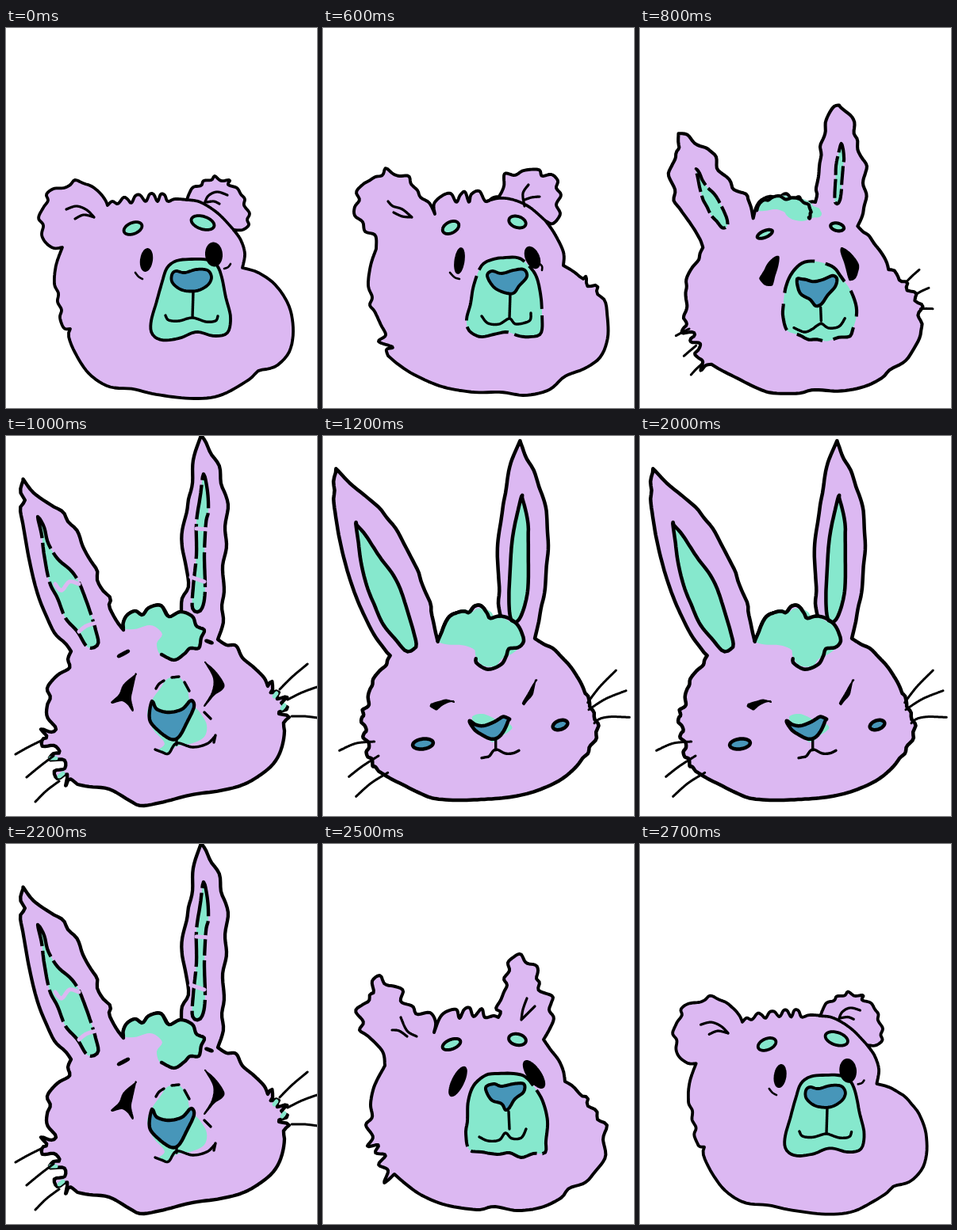
Recreate the animation shown at these times as an HTML page. Size 392 px wide and 480 px high, loop 2.8 s.

```html
<!DOCTYPE html>
<html lang="en">
<head>
<meta charset="utf-8">
<title>Bear to rabbit</title>
<style>
html, body { margin: 0; width: 100%; height: 100%; overflow: hidden; background: #fff; }
svg { display: block; width: 100%; height: 100%; }
</style>
</head>
<body>
<svg id="stage" viewBox="0 0 392 480" stroke-linecap="round" stroke-linejoin="round"></svg>
<script>
const INK = '#000', LILAC = '#dcb8f2', MINT = '#86e8cd', BLUE = '#4796b9';
const LOOP = 2800, STEP = 100, SAMPLES = 90;

// Pose per 100 ms: 0 is the bear, 8 the rabbit, the rest are in-betweens.
const poses = [0, 0, 0, 0, 0, 0, 1, 2, 3, 4, 5, 6, 7, 7.92,
               8, 8, 8, 8, 8, 8, 7, 6, 5, 4, 3, 2, 1, 0.08];

function oval(cx, cy, rx, ry, deg) {
  const a = deg * Math.PI / 180, pts = [];
  for (let i = 0; i < 12; i++) {
    const t = i * Math.PI / 6, x = rx * Math.sin(t), y = -ry * Math.cos(t);
    pts.push((cx + x * Math.cos(a) - y * Math.sin(a)) + ',' + (cy + x * Math.sin(a) + y * Math.cos(a)));
  }
  return pts.join(' ');
}

// In a key, "|" joins segments of one contour and "/" starts a new contour.
const parts = [
  { fill: LILAC, stroke: INK, closed: true, keys: {
    0: '71,277 60,278 50,271 45,261 47,249 41,240 47,227 53,218 51,210 60,203 73,202 81,198 87,192 97,196 108,200 118,208 125,217 128,224' +
      '|128,224 134,219 141,222 148,214 153,216 158,221 163,212 169,211 176,219 181,210 186,210 191,219 195,210 200,211 204,219 213,216 228,217' +
      '|228,217 231,209 236,201 246,199 249,193 259,192 263,187 271,193 282,192 280,198 291,202 296,210 301,216 300,224 307,234 304,242 306,249 298,255 287,255' +
      '|287,255 296,268 301,285 298,303' +
      '|298,303 318,309 340,325 357,352 362,383 357,409 342,426 328,431 318,433 305,445 270,464 235,468 190,463 160,456 130,453 105,437 88,412 79,390 81,380' +
      '|81,380 73,379 68,366 70,356 65,346 66,335 61,323 63,300 71,277',
    1: '67,279 66,262 53,257 50,245 40,237 40,226 46,217 42,207 51,197 58,193 66,188 75,186 79,177 88,184 96,187 108,187 111,197 119,205 123,214 134,221 141,235' +
      '|141,235 140,222 150,212 161,209 168,220 173,211 179,207 184,220 187,210 197,206 205,219 215,214 222,213' +
      '|222,213 228,200 229,184 242,186 253,180 272,179 276,187 288,185 296,193 294,202 300,211 294,223 299,235 290,247 281,244' +
      '|281,244 292,260 303,283 303,300' +
      '|303,300 315,307 328,317 332,313 333,326 346,325 345,335 355,344 358,360 359,390 350,415 330,430 305,440 285,457 255,464 225,460 190,460 150,453 115,438 95,425 82,414' +
      '|82,414 80,406 88,403 70,396 79,388 73,375 65,358 59,350 62,340 57,325 60,300 67,279',
    2: '78,280 75,262 57,243 46,235 51,225 41,211 50,203 58,198 59,190 64,187 62,173 72,166 78,177 91,180 101,185 98,199 113,205 118,215 135,213 142,225 140,238' +
      '|140,238 147,220 155,212 168,209 172,220 178,209 185,207 190,218 200,208 204,219 215,217 221,219' +
      '|221,219 224,212 218,208 224,197 228,187 232,178 228,170 235,160 233,150 240,143 249,139 256,150 268,153 271,160 269,170 273,175 272,185 289,192 288,200 285,210 291,220 285,235 278,247' +
      '|278,247 287,260 297,273 303,287 305,300' +
      '|305,300 315,306 326,318 334,320 333,330 345,337 346,348 358,355 353,372 356,395 342,415 330,428 310,435 300,447 275,459 245,463 215,458 195,462 155,456 125,444 105,430 90,417' +
      '|90,417 77,428 82,412 70,405 79,393 66,390 70,380 56,382 63,370 54,355 62,345 60,328 65,305 78,280',
    5: '82,272 75,262 62,250 52,230 40,200 30,160 22,115 18,91 24,82 18,70 22,55 22,55 35,72 58,88 72,96 78,108 90,120 97,140 107,158 115,170 115,182 122,195 132,205 130,215 139,233 148,245' +
      '|148,245 148,235 153,226 163,221 172,226 180,217 195,214 205,228 212,227 221,222' +
      '|221,222 222,205 230,190 227,165 222,140 222,120 228,95 230,80 235,60 236,30 246,-1 246,-1 252,8 258,22 269,38 271,60 277,75 280,90 276,115 278,140 273,165 275,195 272,215 274,235 267,257' +
      '|267,257 278,264 290,265 298,280 312,292 325,305 330,316' +
      '|330,316 335,309 336,321 333,325 344,322 341,332 355,329 347,338 356,344 342,350 357,354 350,362 351,374 348,392 340,410 325,425 300,440 270,448 235,453 195,463 170,467 155,460 130,446 105,443 90,440' +
      '|90,440 80,433 75,443 77,427 65,433 61,423 74,420 73,409 55,409 60,401 68,400 61,391 46,392 46,383 52,380 44,370 57,374 63,369 52,355 52,340 56,330 52,318 65,302 80,293 78,282 82,272',
    8: '86,280 78,272 62,245 45,210 30,170 18,125 12,85 10,55 15,36 15,36 35,55 60,77 85,105 105,135 122,170 135,205 141,235 143,267' +
      '|143,267 150,255 157,233 167,222 178,222 185,227 190,216 200,213 209,223 211,232 225,230' +
      '|225,230 219,205 218,160 222,120 228,75 236,40 249,11 249,11 255,30 266,50 278,80 285,110 287,140 285,175 280,205 272,230 267,255' +
      '|267,255 290,270 310,287 322,308 331,330' +
      '|331,330 340,360 344,385 335,410 315,430 285,445 240,457 200,462 160,461 120,452 85,437 60,415' +
      '|60,415 52,390 48,360 55,325 70,300 86,280' } },
  { stroke: INK, width: 3.6, keys: {
    0: '228,217 245,220 267,234 287,255', 1: '205,219 222,215 240,217 260,226 281,244' }, to: 1 },
  { stroke: INK, width: 3.2, keys: {
    0: '76,229 89,225 102,230 111,239/87,241 98,236 111,239/250,222 255,212 266,207 279,211/253,220 262,219 269,222',
    1: '82,219 88,225 100,229 112,239/89,233 100,238 112,239/254,225 252,209 259,198/254,217 263,214 273,213',
    2: '87,235 96,236 106,243/98,219 106,236 118,243/257,195 252,209 250,222/250,222 258,214 267,205' }, to: 2 },
  { fill: MINT, stroke: INK, closed: true, from: 3, dash: { 3: '24 5', 4: '32 6', 5: '44 6', 6: '90 4' }, keys: {
    2: '86,216 99,229 108,240 103,245 92,233/256,195 258,207 252,222 250,207',
    5: '40,102 48,115 53,135 65,155 82,170 92,185 100,205 107,225 113,245 116,263 103,267 90,247 75,230 65,205 55,185 48,150 45,125' +
      '/249,48 254,70 255,95 252,110 250,150 251,190 249,212 243,222 235,217 236,190 240,150 240,110 245,75',
    8: '42,115 42,115 60,130 80,160 97,190 108,225 118,262 116,270 107,275 95,265 75,240 60,205 48,165' +
      '/251,90 251,90 260,120 263,160 262,200 252,230 243,243 236,235 233,205 235,165 241,125' } },
  { stroke: LILAC, width: 5, from: 4, to: 6, keys: {
    4: '66,196 73,200 81,190 86,191/94,243 112,237/241,122 253,123/236,181 250,184',
    5: '62,187 70,195 80,184 92,187/92,247 101,240 113,236/240,117 255,118/233,178 250,184',
    6: '60,184 66,189 72,182/97,255 110,250/246,118 255,119/238,190 244,192' } },
  { fill: MINT, closed: true, from: 3, keys: {
    2: '147,224 155,214 170,211 190,211 210,218 221,221 215,225 190,224 165,224',
    5: '148,243 148,235 153,226 163,221 172,226 180,217 195,214 205,228 220,222 235,228 240,240 250,245 246,255 243,268 232,268 225,275 212,283 195,277 190,262 197,250 183,239 162,244',
    8: '143,267 150,255 157,233 167,222 178,222 185,227 190,216 200,213 209,223 211,232 225,230 240,235 254,248 255,265 246,275 230,281 226,295 206,301 190,291 190,283 172,276 155,273' } },
  { stroke: INK, from: 3, keys: {
    2: '147,224 155,214 170,211 190,211 210,218 221,221',
    5: '148,243 148,235 153,226 163,221 172,226 180,217 195,214 205,228 220,222 235,228 240,240 250,245 246,255 243,268 232,268 225,275 212,283 196,276',
    8: '143,267 150,255 157,233 167,222 178,222 185,227 190,216 200,213 209,223 211,232 225,230 240,235 254,248 255,265 246,274 229,270 229,283 225,295 206,301 190,291 191,284' } },
  { fill: MINT, stroke: INK, closed: true, to: 5, keys: {
    0: oval(160, 253, 12, 7, -22) + '/' + oval(248, 246, 15, 8, 18),
    1: oval(161, 252, 11, 7, -28) + '/' + oval(245, 245, 11, 7, 18),
    2: oval(162, 253, 12, 6, -22) + '/' + oval(245, 247, 11, 7, 12),
    5: oval(148, 275, 7, 0.4, -28) + '/' + oval(256, 260, 4, 0.4, 20) } },
  { stroke: INK, width: 2.6, to: 1, keys: {
    0: '163,309 167,314 172,317/275,304 280,302 283,298', 1: '160,309 166,315 172,317/272,297 276,301 276,306' } },
  { fill: MINT, stroke: INK, closed: true, to: 7,
    dash: { 1: '58 8', 2: '86 7', 3: '34 14', 4: '16 22', 5: '0 999', 6: '0 999', 7: '0 999' }, keys: {
    0: '203,303 215,294 235,292 255,293 266,300 272,315 277,340 283,365 279,385 262,389 240,384 218,392 196,394 184,386 183,370 190,345 197,320',
    1: '200,300 215,292 230,290 245,290 255,296 268,312 274,335 276,360 275,385 262,390 247,389 232,384 215,387 198,390 184,382 181,368 186,348 190,325',
    2: '190,305 205,292 220,290 240,290 255,294 267,308 277,325 283,350 281,375 280,390 265,391 250,396 235,390 220,392 200,389 184,386 180,365 182,350 183,325',
    5: '195,318 203,307 217,304 228,318 232,335 245,350 253,365 250,380 235,388 215,392 205,400 192,397 200,388 185,370 178,350 185,332',
    8: '185,372 200,375 215,368 235,361 230,373 218,384 204,381 192,377' } },
  { stroke: INK, width: 3.4, from: 4.5, to: 6, keys: {
    5: '189,319 193,313 199,309/209,305 218,304/225,311 231,322/250,349 258,357/264,378 262,387',
    6: '193,331 199,327/212,323 218,322/225,328 230,336/247,355 251,361/254,382 252,388' } },
  { fill: INK, stroke: INK, width: 2, closed: true, keys: {
    0: oval(177, 293, 7, 14, 8) + '/' + oval(262, 286, 10, 14.5, -4),
    1: oval(172, 294, 5.5, 16, 8) + '/' + oval(264, 290, 8, 14, -24),
    2: oval(170, 300, 7, 20, 26) + '/' + oval(266, 291, 8, 20, -35),
    5: '163,302 163,302 159,320 157,332 160,347 154,339 146,334 133,337 143,327 149,314/252,287 252,287 264,298 274,313 272,320 262,327 250,341 260,324 262,306',
    8: '166,353 157,347 146,345 135,345 127,343 137,340 147,339 158,343/278,319 269,323 258,332 251,343 255,331 265,320' } },
  { fill: BLUE, stroke: INK, closed: true, keys: {
    0: '209,312 214,307 225,309 240,305 254,306 259,315 254,325 240,332 222,331 210,322',
    1: '207,313 213,307 225,310 240,306 253,305 257,314 247,326 240,335 228,334 215,327',
    2: '205,308 215,303 225,306 240,303 253,303 253,313 242,322 235,333 230,336 225,328 212,323',
    5: '184,335 190,345 205,349 222,345 233,334 237,342 228,362 218,380 208,383 193,373 181,358',
    8: '185,372 200,375 215,368 235,361 235,361 230,373 218,384 204,381 192,377' } },
  { stroke: INK, width: 3.4, keys: {
    0: '236,333 235,366/201,363 205,369 218,370 235,366 252,371 264,370 267,364',
    1: '236,336 235,367/200,364 208,373 222,374 235,367 243,374 260,370 262,360',
    2: '234,338 235,360/197,370 208,375 222,374 230,365 238,372 250,371 256,360',
    5: '215,383 215,390/188,396 196,399 205,401 215,388 235,393 253,389 263,380',
    8: '219,384 219,400/206,412 212,406 219,400 228,406 239,406' } },
  { fill: BLUE, stroke: INK, closed: true, from: 6, keys: {
    5: oval(126, 389, 1, 1, 0) + '/' + oval(299, 365, 1, 1, 0),
    8: oval(126, 389, 19, 9, -8) + '/' + oval(299, 365, 14, 8, -20) } },
  { stroke: MINT, width: 5, from: 5, to: 6, keys: {
    5: '56,407 63,407/67,430 72,426/341,325 338,329/351,340 348,344',
    6: '60,408 63,408/71,429 73,427/340,328 339,330/348,342 347,344' } },
  { stroke: INK, width: 3, from: 3, keys: {
    2: '62,382 70,378/70,406 76,400/78,426 84,418/332,320 338,314/344,338 350,334/350,355 357,354',
    5: '12,402 28,393 46,384/26,431 43,417 60,404/37,462 51,448 67,436/345,320 361,304 380,288/355,333 373,324 392,317/360,354 376,354 393,356',
    8: '25,395 48,386 74,387/36,430 53,417 75,404/44,452 65,434 89,420/328,345 343,323 364,300/325,352 348,336 377,324/333,367 340,359 355,355 383,355' } }
];

const lerp = (a, b, t) => a + (b - a) * t;

// Smooth curve through the points, resampled at even distances.
function sample(text, closed) {
  const p = text.trim().split(' ').map(s => s.split(',').map(Number)), n = p.length;
  const at = i => closed ? p[(i + n) % n] : p[Math.max(0, Math.min(n - 1, i))];
  const fine = [], dist = [0];
  for (let i = 0; i < (closed ? n : n - 1); i++) {
    const [a, b, c, d] = [at(i - 1), at(i), at(i + 1), at(i + 2)];
    for (let k = 0; k < 10; k++) {
      const t = k / 10;
      fine.push([0, 1].map(j => b[j] + t / 2 * (c[j] - a[j] +
        t * (2 * a[j] - 5 * b[j] + 4 * c[j] - d[j] + t * (3 * (b[j] - c[j]) + d[j] - a[j])))));
    }
  }
  fine.push(closed ? p[0] : p[n - 1]);
  for (let i = 1; i < fine.length; i++)
    dist.push(dist[i - 1] + Math.hypot(fine[i][0] - fine[i - 1][0], fine[i][1] - fine[i - 1][1]));
  const out = [], total = dist[dist.length - 1];
  for (let k = 0, i = 1; k <= SAMPLES; k++) {
    const want = total * k / SAMPLES;
    while (i < fine.length - 1 && dist[i] < want) i++;
    const t = (want - dist[i - 1]) / (dist[i] - dist[i - 1] || 1);
    out.push([lerp(fine[i - 1][0], fine[i][0], t), lerp(fine[i - 1][1], fine[i][1], t)]);
  }
  return out;
}

function contours(key, closed) {
  return key.split('/').map(c => {
    const segs = c.split('|');
    return segs.flatMap(s => sample(s, closed && segs.length === 1));
  });
}

const stage = document.getElementById('stage');
for (const part of parts) {
  part.times = Object.keys(part.keys).map(Number);
  part.shapes = part.times.map(k => contours(part.keys[k], part.closed));
  part.el = document.createElementNS('http://www.w3.org/2000/svg', 'path');
  part.el.setAttribute('fill', part.fill || 'none');
  part.el.setAttribute('stroke', part.stroke || 'none');
  stage.appendChild(part.el);
}

function draw(pose) {
  for (const { el, times, shapes, from = 0, to = 8, width, dash, closed } of parts) {
    const shown = pose >= from && pose <= to;
    el.style.display = shown ? '' : 'none';
    if (!shown) continue;
    let i = 0;
    while (i < times.length - 2 && pose > times[i + 1]) i++;
    const j = Math.min(i + 1, times.length - 1);
    const t = j > i ? Math.max(0, Math.min(1, (pose - times[i]) / (times[j] - times[i]))) : 0;
    const d = shapes[i].map((c, m) => 'M' + c.map((p, k) => {
      const q = shapes[j][m][k];
      return lerp(p[0], q[0], t).toFixed(1) + ' ' + lerp(p[1], q[1], t).toFixed(1);
    }).join('L') + (closed ? 'Z' : '')).join('');
    el.setAttribute('d', d);
    el.setAttribute('stroke-width', width || lerp(3.8, 4.6, pose / 8));
    el.setAttribute('stroke-dasharray', dash && dash[Math.round(pose)] || 'none');
    // Zero-length dashes would leave a round dot.
    el.setAttribute('stroke-linecap', dash ? 'butt' : 'round');
  }
}

const start = performance.now();
let last = -1;
function tick() {
  const slot = Math.floor((performance.now() - start) % LOOP / STEP);
  if (slot !== last) draw(poses[last = slot]);
  requestAnimationFrame(tick);
}
tick();
</script>
</body>
</html>
```
